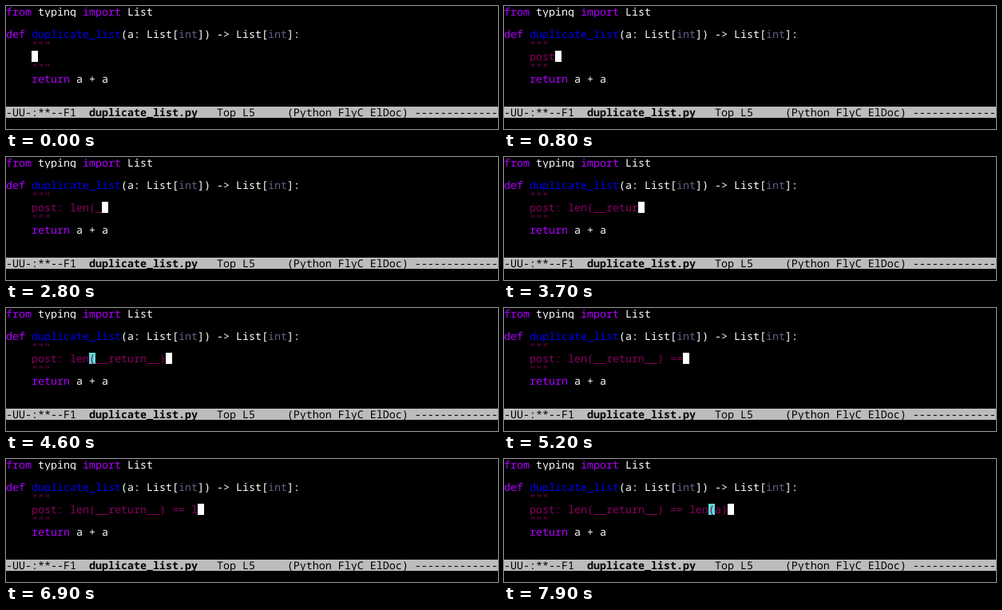
An HTML page for the animation above (8 s loop, 616x154 px).

```html
<!DOCTYPE html>
<html lang="en">
<head>
<meta charset="utf-8">
<title>Typing a postcondition</title>
<style>
  html, body { margin: 0; width: 100%; height: 100%; overflow: hidden; background: #000; }
  #screen {
    position: relative; width: 616px; height: 154px; overflow: hidden;
    background: #000; color: #fff;
    font: 13.3333px/14px "Noto Sans Mono", "DejaVu Sans Mono", monospace;
    font-variant-ligatures: none; font-kerning: none;
    text-rendering: geometricPrecision;
  }
  .row { position: absolute; left: 0; width: 616px; height: 14px; white-space: pre; overflow: hidden; }
  .kw { color: #af00ff; }
  .fn { color: #0000ee; }
  .type { color: #5f5f87; }
  .str { color: #87005f; }
  .mode { background: #bcbcbc; color: #000; }
  .box { position: absolute; top: 0; width: 8px; height: 14px; }
  #cursor { background: #fff; }
  #match { background: #5fd7d7; }
  #typed { position: absolute; left: 32px; top: 0; }
</style>
</head>
<body>
<div id="screen">
  <div class="row" style="top:0"><span class="kw">from</span> typing <span class="kw">import</span> List</div>
  <div class="row" style="top:28px"><span class="kw">def</span> <span class="fn">duplicate_list</span>(a: List[<span class="type">int</span>]) -&gt; List[<span class="type">int</span>]:</div>
  <div class="row str" style="top:42px">    """</div>
  <div class="row str" style="top:56px"><i id="match" class="box"></i><span id="typed"></span><i id="cursor" class="box"></i></div>
  <div class="row str" style="top:70px">    """</div>
  <div class="row" style="top:84px">    <span class="kw">return</span> a + a</div>
  <div class="row mode" style="top:126px">-UU-:**--F1  <b>duplicate_list.py</b>   Top L5     (Python <span id="check"></span></div>
</div>
<script>
const LOOP = 8000, CELL = 8, INDENT = 4;
const LINE = "post: len(__return__) == len(a)";
// One time per typed character, in ms.
const KEYS = [
  500, 600, 700, 800, 1100, 1400, 1900, 2000, 2200, 2500,
  2800, 3000, 3200, 3200, 3400, 3500, 3700, 3800, 4200, 4300,
  4600, 4800, 5000, 5200, 5700, 6900, 7000, 7100, 7500, 7700, 7900
];
// Spans during which the syntax checker is running.
const CHECKS = [[1900, 2200], [5700, 6000], [6200, 6500]];

const get = id => document.getElementById(id);
const typed = get("typed"), cursor = get("cursor"), match = get("match"), check = get("check");
const place = (el, col) => { el.style.left = (INDENT + col) * CELL + "px"; };

function draw(t) {
  const count = KEYS.filter(k => k <= t).length;
  const text = LINE.slice(0, count);
  typed.textContent = text;
  place(cursor, count);

  const closed = text.endsWith(")");
  match.style.display = closed ? "block" : "none";
  if (closed) place(match, text.lastIndexOf("("));

  const busy = CHECKS.some(([from, to]) => t >= from && t < to);
  check.textContent = "FlyC" + (busy ? "*" : "") + " ElDoc) " + "-".repeat(busy ? 12 : 13);
}

const start = performance.now();
function tick() {
  draw((performance.now() - start) % LOOP);
  requestAnimationFrame(tick);
}
draw(0);
requestAnimationFrame(tick);
</script>
</body>
</html>
```
